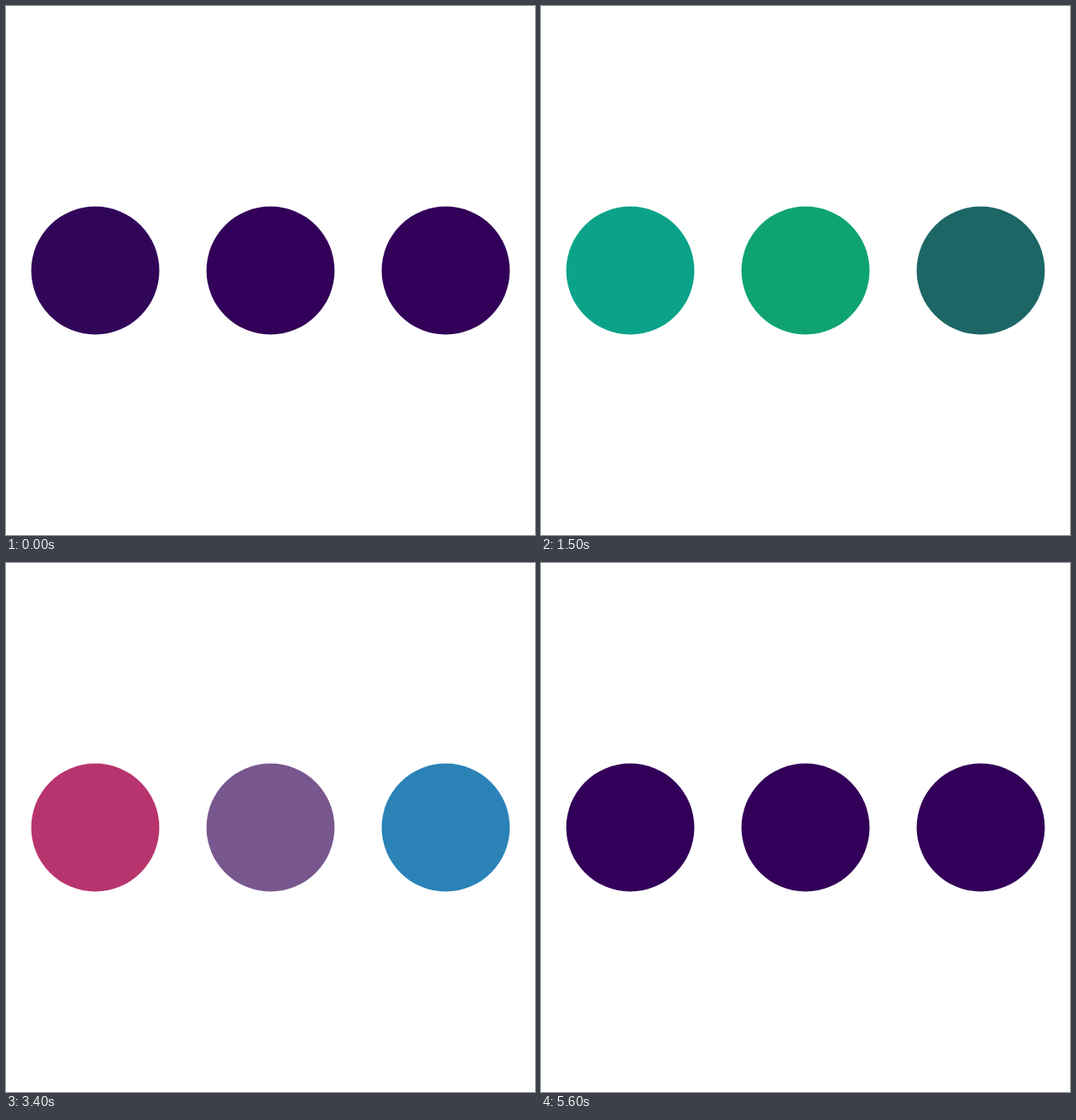
Animation of 640x640 px, one loop 6100 ms. Source, as an HTML page:

```html
<!DOCTYPE html>
<html lang="en">
<head>
<meta charset="utf-8">
<title>Three dots</title>
<style>
  html, body { margin: 0; width: 100%; height: 100%; overflow: hidden; background: #fff; }
  svg { display: block; width: 100%; height: 100%; }
</style>
</head>
<body>
<svg viewBox="0 0 640 640">
  <circle cx="108" cy="320" r="77.5"/>
  <circle cx="320" cy="320" r="77.5"/>
  <circle cx="532" cy="320" r="77.5"/>
</svg>
<script>
const LOOP = 6100, STEP = 100, LAST_STEP = 5600;
const FADE = 1200;
const STARTS = [-40, 320, 765];
const COLORS = [
  [50, 0, 88],
  [14, 167, 111],
  [0, 153, 204],
  [212, 37, 96],
  [50, 0, 88]
];
const dots = document.querySelectorAll("circle");

function colorAt(time) {
  const last = COLORS.length - 1;
  const position = Math.max(0, Math.min(last, time / FADE));
  const index = Math.min(last - 1, Math.floor(position));
  const mix = position - index;
  const rgb = COLORS[index].map((from, i) =>
    Math.round(from + (COLORS[index + 1][i] - from) * mix));
  return `rgb(${rgb})`;
}

function draw(time) {
  const stepped = Math.min(LAST_STEP, Math.floor(time / STEP) * STEP);
  dots.forEach((dot, i) => dot.setAttribute("fill", colorAt(stepped - STARTS[i])));
}

const begin = performance.now();
function tick() {
  draw((performance.now() - begin) % LOOP);
  requestAnimationFrame(tick);
}
tick();
</script>
</body>
</html>
```
